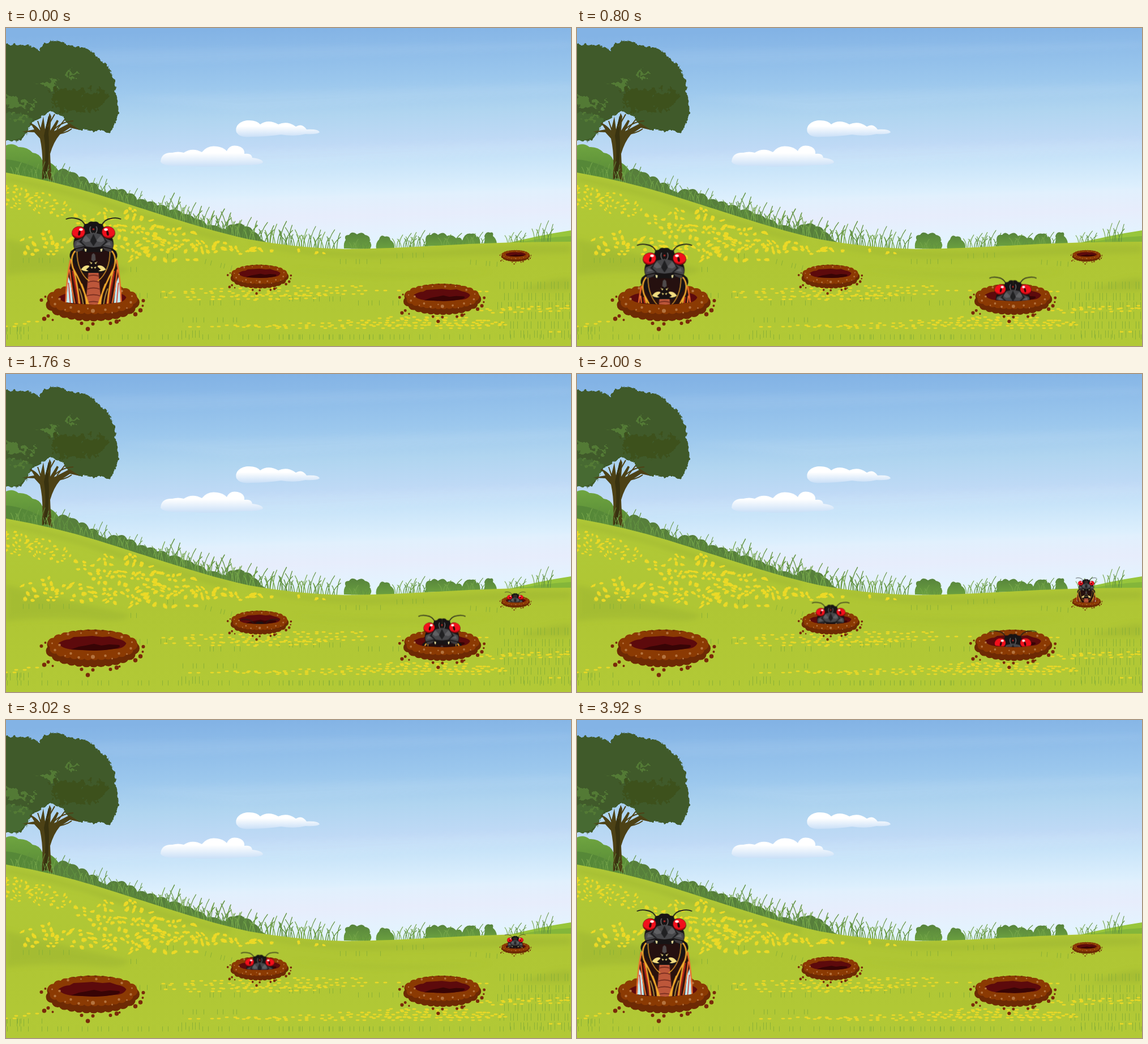
An HTML page without scripts that plays this animation: 998 px wide and 561 px high, repeating every 4450 ms.

```html
<!DOCTYPE html>
<html lang="en">
<head>
<meta charset="utf-8">
<title>Meadow cicadas</title>
<style>
html, body { margin: 0; width: 100%; height: 100%; overflow: hidden; background: #b0c834; }
svg { position: absolute; inset: 0; width: 100%; height: 100%; }
.dots { fill: none; stroke-linecap: round; }
.flowers path { stroke-dasharray: 0 15 0 24 0 12 0 33 0 18; }
.flowers .alt { stroke-dasharray: 0 27 0 14 0 22 0 11 0 37; }
.blades { fill: none; stroke: #8bb136; stroke-width: 9; stroke-dasharray: 1 9 1 17 1 5 1 12 1 23; }
.bug { animation: 4450ms linear infinite; }
.near { animation-name: near; }
.mid { animation-name: mid; }
.right { animation-name: right; }
.far { animation-name: far; }
@keyframes near {
  0%, 11.24% { transform: translateY(0); }
  17.98% { transform: translateY(46px); }
  25.39% { transform: translateY(160px); }
  74.6% { transform: translateY(201px); }
  88.09%, 100% { transform: translateY(0); }
}
@keyframes right {
  0%, 11.23% { transform: translateY(150px); }
  11.24% { transform: translateY(99px); }
  26.07%, 33.48% { transform: translateY(0); }
  49.66%, 53.47% { transform: translateY(99px); }
  53.48%, 100% { transform: translateY(150px); }
}
@keyframes mid {
  0%, 33.48% { transform: translateY(145px); }
  49.66%, 61.8% { transform: translateY(0); }
  74.6% { transform: translateY(113px); }
  75%, 100% { transform: translateY(145px); }
}
@keyframes far {
  0%, 33.48% { transform: translateY(184px); }
  45.62%, 61.8% { transform: translateY(0); }
  77.3%, 100% { transform: translateY(184px); }
}
</style>
</head>
<body>
<svg viewBox="0 0 998 561" preserveAspectRatio="none">
  <defs>
    <linearGradient id="sky" gradientUnits="userSpaceOnUse" x1="490" y1="0" x2="502" y2="390">
      <stop offset="0" stop-color="#83b3e5"/>
      <stop offset=".25" stop-color="#9bc7ed"/>
      <stop offset=".4" stop-color="#b0d5f0"/>
      <stop offset=".54" stop-color="#c0daf6"/>
      <stop offset=".62" stop-color="#c8e4f9"/>
      <stop offset=".75" stop-color="#dceffd"/>
      <stop offset=".77" stop-color="#e1f0fd"/>
      <stop offset=".86" stop-color="#e7edfc"/>
      <stop offset="1" stop-color="#e2f5ff"/>
    </linearGradient>
    <linearGradient id="cloud" x2="0" y2="1">
      <stop offset=".35" stop-color="#fff"/>
      <stop offset="1" stop-color="#c9dff7"/>
    </linearGradient>
    <linearGradient id="verge" x2="0" y2="1">
      <stop offset="0" stop-color="#6fa540"/>
      <stop offset="1" stop-color="#4f8033"/>
    </linearGradient>
    <linearGradient id="bush" x2="0" y2="1">
      <stop offset="0" stop-color="#56833b"/>
      <stop offset="1" stop-color="#6ba040"/>
    </linearGradient>
    <linearGradient id="field" x2="0" y2="1">
      <stop offset="0" stop-color="#b1c937"/>
      <stop offset=".5" stop-color="#afc634"/>
      <stop offset="1" stop-color="#b2c936"/>
    </linearGradient>
    <filter id="leafy" x="-10%" y="-10%" width="120%" height="120%">
      <feTurbulence type="fractalNoise" baseFrequency=".13" numOctaves="2" seed="4"/>
      <feDisplacementMap in="SourceGraphic" scale="9" xChannelSelector="R" yChannelSelector="G"/>
    </filter>
    <filter id="ragged" x="-20%" y="-20%" width="140%" height="140%">
      <feTurbulence type="fractalNoise" baseFrequency=".09" numOctaves="3" seed="9"/>
      <feDisplacementMap in="SourceGraphic" scale="34" xChannelSelector="R" yChannelSelector="G"/>
    </filter>
    <filter id="scatter">
      <feTurbulence type="fractalNoise" baseFrequency=".035" seed="3"/>
      <feDisplacementMap in="SourceGraphic" scale="24" xChannelSelector="R" yChannelSelector="G"/>
    </filter>
    <filter id="soft"><feGaussianBlur stdDeviation="5"/></filter>
    <g id="tuft" fill="none" stroke="#74a449" stroke-width="1.5" stroke-linecap="round">
      <path d="M-20 2Q-21-14-27-24M-17 2Q-17-12-12-22M-12 2Q-12-20-4-35M-7 2Q-9-15-16-23"/>
      <path d="M-3 3Q-2-14 4-22M1 3Q3-22 15-40M6 3Q5-14 0-25M10 4Q14-14 27-24M15 4Q14-12 10-18M19 5Q20-20 26-33" stroke="#629240"/>
    </g>
    <g id="hole">
      <g fill="none" stroke="#7a2a0a" stroke-linecap="round">
        <path stroke-width="7.5" d="M-85 29h0M-8 47h0M43 34h0M76 21h0M85 14h0"/>
        <path stroke-width="6" d="M-90-4h0M-78 24h0M-19 37h0M1 38h0M32 37h0M90-3h0"/>
        <path stroke-width="4" d="M-70 31h0M48 32h0M89 6h0M-83-10h0"/>
      </g>
      <ellipse rx="73" ry="23" fill="#6d2a04" stroke="#6d2a04" stroke-width="21" stroke-linecap="round" stroke-dasharray="0 13"/>
      <ellipse cy="-6" rx="71" ry="18" fill="#8b3a03" stroke="#8b3a03" stroke-width="18" stroke-linecap="round" stroke-dasharray="0 12"/>
      <path d="M-60-9Q-50-16-40-16L-33-20L-14-21L0-22L18-20L31-21L43-17Q56-15 60-9Q56 1 38 1L22 3L4 4L-18 3L-36 2Q-55 0-60-9z" fill="#5d0a0c"/>
      <path d="M-38 2L-24-3L-12-5L3-8L16-5L30-7L47-6Q53-2 38 1L22 3L4 4L-18 3z" fill="#380405"/>
      <g class="dots" stroke="#b4733f">
        <path stroke-width="7" d="M1 15h0"/>
        <path stroke-width="4.5" d="M-38 9h0M-24 16h0M23 13h0M47 9h0M68 0h0M-58-6h0M-66 3h0M7-27h0M-43-25h0M52-20h0"/>
        <path stroke-width="3" d="M-48 13h0M-8 11h0M35 18h0M61 10h0M-20-27h0M29-27h0M-71-9h0M70-11h0"/>
      </g>
    </g>
  </defs>

  <rect width="998" height="561" fill="url(#sky)"/>
  <g fill="#fff" opacity=".05" filter="url(#soft)">
    <path d="M0 42L998 25V34L330 61L0 66zM200 122L998 98V112L410 145zM0 230L998 195V212L520 242L0 250z"/>
  </g>
  <g fill="url(#cloud)">
    <path d="M407 184C403 171 417 162 430 163Q443 163 449 170Q463 160 481 170Q497 163 512 174Q523 167 531 179Q552 178 554 184Q549 188 529 187Q508 192 486 188Q458 192 431 192Q413 194 407 184z"/>
    <path d="M273 236Q274 219 294 220Q304 217 314 220Q329 210 346 219Q356 206 373 209Q383 210 390 217Q395 205 409 208Q422 211 421 222Q434 220 435 229Q453 231 454 237Q450 242 421 242Q366 247 316 243Q278 245 273 236z"/>
  </g>

  <path d="M0 207Q12 202 22 210Q37 209 47 220Q59 221 64 233Q84 236 94 254Q112 260 130 285L0 270z" fill="url(#verge)"/>
  <path d="M0 232Q45 235 100 274L0 262z" fill="#568838"/>
  <path d="M72 274L92 252Q101 243 112 254Q125 253 129 263Q141 258 147 274Q160 269 164 284L178 291Q187 280 197 286Q209 280 214 292Q228 289 231 303Q244 299 249 307Q262 303 267 313Q283 309 287 322Q302 316 313 328Q328 328 334 337Q350 337 355 349Q372 345 381 355Q388 353 390 356Q391 344 403 347Q415 341 421 350Q434 349 436 359Q446 361 450 372L470 385H300z" fill="#577f3b"/>

  <g filter="url(#leafy)" transform="translate(-2 0)">
    <path d="M-9 27Q14 29 25 31Q48 26 61 43Q59 26 90 22Q106 26 122 34Q153 32 163 54Q184 61 187 81Q199 90 196 119Q204 146 198 157Q195 174 184 187Q172 178 157 182Q143 175 133 181Q118 179 108 165Q98 149 78 148L56 163Q41 172 39 187Q25 204 15 198L-9 194z" fill="#3f5a29"/>
    <path d="M-9 151Q20 145 50 160L38 184Q22 204-9 196z" fill="#466b30"/>
  </g>
  <g filter="url(#ragged)" transform="translate(-4 -2)">
    <path d="M82 113Q115 101 142 117Q170 103 184 119Q179 151 146 145Q117 158 90 140z" fill="#3d511f"/>
    <path d="M-8 121L24 125L43 137L61 131L51 142L27 139L2 143zM57 101L80 92L99 104L76 108zM110 85L125 80L132 87L113 92zM11 160L33 157L42 165L18 168z" fill="#537a36"/>
  </g>
  <path d="M63 267Q67 226 60 195L50 184L28 183L50 179L42 166L60 181L66 156L69 179L77 150L80 156L78 181L90 162L93 164L85 182L112 168L131 180L113 176L95 188Q84 201 78 222Q79 251 82 270L73 265z" fill="#4d4216"/>
  <path d="M65 265Q73 226 67 190L75 155L77 159L75 187Q78 212 72 265z" fill="#383210"/>
  <path d="M80 184Q96 165 119 164M64 188Q52 170 42 169M82 188Q104 187 116 178M73 175L86 152M62 182L56 164M90 179L104 161" fill="none" stroke="#4d4216" stroke-width="2"/>

  <g fill="url(#bush)">
    <path d="M597 389Q596 378 600 374Q596 365 606 365Q611 357 620 364Q629 358 634 365Q645 367 642 376Q648 382 643 390zM654 390Q652 379 659 373Q662 363 669 368Q678 366 679 374Q687 378 686 389z"/>
    <path d="M739 385Q743 379 741 374Q741 363 751 365Q756 358 763 365Q773 357 779 367Q788 363 795 371Q803 367 806 375Q811 360 822 363Q830 361 831 369Q837 365 838 382zM844 380Q847 374 845 367Q848 358 855 361Q862 359 860 367Q866 371 867 380z"/>
  </g>
  <path d="M880 381Q944 365 998 357V385z" fill="#98c63c"/>
  <path d="M905 378Q955 369 998 367V380z" fill="#84b63a"/>

  <g>
    <use href="#tuft" transform="translate(60 268) scale(.6 .8)"/>
    <use href="#tuft" transform="translate(30 262) scale(.8 .7)"/>
    <use href="#tuft" transform="translate(92 275) scale(.8 .9)"/>
    <use href="#tuft" transform="translate(124 284) scale(-.7 .6)"/>
    <use href="#tuft" transform="translate(160 293) scale(.7 .8)"/>
    <use href="#tuft" transform="translate(192 302) scale(-.7 .6)"/>
    <use href="#tuft" transform="translate(222 311) scale(.7 .7)"/>
    <use href="#tuft" transform="translate(255 321) scale(-.7 .5)"/>
    <use href="#tuft" transform="translate(284 331) scale(.9 1)"/>
    <use href="#tuft" transform="translate(302 337) scale(-.8 .9)"/>
    <use href="#tuft" transform="translate(322 344) scale(.9 .9)"/>
    <use href="#tuft" transform="translate(347 352) scale(.8 .9)"/>
    <use href="#tuft" transform="translate(371 359) scale(1 1)"/>
    <use href="#tuft" transform="translate(392 364) scale(-.8 1)"/>
    <use href="#tuft" transform="translate(420 370) scale(.9 .9)"/>
    <use href="#tuft" transform="translate(447 375) scale(1 .8)"/>
    <use href="#tuft" transform="translate(482 381) scale(.9 1)"/>
    <use href="#tuft" transform="translate(507 384) scale(-.9 .8)"/>
    <use href="#tuft" transform="translate(535 386) scale(.8 .9)"/>
    <use href="#tuft" transform="translate(567 388) scale(.9 .8)"/>
    <use href="#tuft" transform="translate(625 390) scale(.7 .5)"/>
    <use href="#tuft" transform="translate(704 386) scale(.8 .6)"/>
    <use href="#tuft" transform="translate(728 385) scale(.8 .7)"/>
    <use href="#tuft" transform="translate(790 382) scale(1 .5)"/>
    <use href="#tuft" transform="translate(832 380) scale(.7 .5)"/>
    <use href="#tuft" transform="translate(900 378) scale(.7 .5)"/>
    <use href="#tuft" transform="translate(948 376) scale(.7 .9)"/>
  </g>

  <path d="M0 255Q85 270 160 293C270 327 350 356 430 373Q512 388 600 390Q680 389 760 384Q880 377 998 377V561H0z" fill="url(#field)"/>
  <g fill="#9bb431" filter="url(#soft)" opacity=".5">
    <path d="M0 261Q100 279 205 315Q300 346 400 370L390 378Q240 341 140 303Q60 282 0 270z"/>
    <path d="M0 372Q120 403 218 424Q214 440 150 433Q60 428 0 436zM430 378Q600 403 770 392Q880 380 998 383V397Q800 402 640 406Q500 402 430 378zM905 464Q956 442 998 441V463z"/>
    <path d="M500 425Q690 449 860 429Q690 441 500 425z"/>
  </g>

  <g class="blades">
    <path d="M30 410H125M220 426H245M352 412l75 18M590 412H665M690 402l60-2M820 413L872 417M285 402h22"/>
    <path stroke-dashoffset="8" d="M0 545H998M0 531H70M310 515H420M480 545H700M620 485H700M210 472H300M480 478H610M340 485H420"/>
    <path stroke-width="13" stroke-dasharray="1 6 1 11 1 4" d="M872 454H998M880 474H998M868 490H998M880 507H998M872 524H998M890 540H998M310 540H345M0 534H35"/>
  </g>
  <g filter="url(#scatter)">
    <g class="dots flowers" stroke="#ecd925" transform="scale(1 .72)">
      <path stroke-width="5.5" d="M0 386l42 10M3 393l70 18M0 400l100 25M5 407l103 25M0 416l116 28M4 425l110 27M0 433l112 26M8 442l96 20"/>
      <path class="alt" stroke-width="5" d="M0 391l40 5M0 397l82 18M0 411l108 24M0 421l90 21"/>
      <path stroke-width="7.5" d="M176 445l68 6M124 457l130 8M139 467l130 3M123 478l200 13M145 489l185 5M65 501l30 2M150 500l190 6M65 512l60 4M161 511l202 14M30 520l380 8M52 532l360 2M40 543l420 0M33 553l220 3M232 550l250-4M180 563l185 4"/>
      <path class="alt" stroke-width="6.5" d="M180 450l58 6M160 484l155 6M180 496l160 11M150 537l330 4M520 550l54 5"/>
      <path stroke-width="10" stroke-dasharray="none" d="M90 525h2M437 537h4M270 516h1M264 509h1"/>
    </g>
  </g>
  <g class="dots flowers" stroke="#e9d827" transform="scale(1 .4)">
    <path stroke-width="7" d="M278 1163l362-5M330 1151l302-8M410 1177l228-4M282 1188l268-8M326 1198l220-6M510 1138l130 0M655 1158h46M798 1162h66"/>
    <path class="alt" stroke-width="7" d="M290 1169l330 0M380 1183l220-4M440 1200l95-8"/>
    <path stroke-width="7" d="M325 1318l170-4M390 1311l500-2M480 1324l390 0M520 1302l360-4M590 1290l270 0M660 1280l180-3M840 1246l158-10M890 1232l108-8M860 1256l120-8M962 1340h36M0 1316h36M18 1305h28M40 1295h26"/>
    <path class="alt" stroke-width="7" d="M420 1319l180-3M610 1297l270 8M650 1315l240-4M700 1285l170 6M630 1308l240 6M850 1239l148-4M680 1274l110 2"/>
  </g>

  <use href="#hole" transform="translate(900 402) scale(.305)"/>
  <use href="#hole" transform="translate(447.500 438.500) scale(.62 .635)"/>
  <use href="#hole" transform="translate(770 478.500) scale(.83)"/>
  <use href="#hole" transform="translate(152.500 484)"/>
</svg>

<svg viewBox="0 0 998 561" preserveAspectRatio="none">
  <defs>
    <clipPath id="mouth">
      <path d="M-95-220V-9H-60Q-56 1-38 1L-18 3L4 4L22 3L38 1Q56 1 60-9H95V-220z"/>
    </clipPath>
    <g id="wing">
      <path d="M-34 62Q-46 88-49 151L-8 157L-4 92z" fill="#2a120d"/>
      <path d="M-45 103L-48 150L-36 152L-40 116z" fill="#c4eff5"/>
      <path d="M-38 98L-29 153L-21 154L-29 118z" fill="#7d1d13"/>
      <g fill="none" stroke-linecap="round">
        <path d="M-41 76Q-48 112-49 151M-42 93Q-39 124-33 152" stroke="#ee6c2e" stroke-width="2.4"/>
        <path d="M-44 116L-41 151M-37 95L-24 152" stroke="#d22d21" stroke-width="1.6"/>
      </g>
    </g>
    <g id="veins" fill="none" stroke="#f3a92c" stroke-linecap="round" stroke-width="2.6">
      <path d="M-33 60Q-42 72-36 90Q-20 118-9 153M-35 92Q-27 124-25 153M-21 118Q-14 134-12 154"/>
      <path d="M-29 61Q-29 78-24 90Q-18 105-8 112" stroke="#d9952a" stroke-width="1.6"/>
      <path d="M-25 126Q-20 138-18 154" stroke="#e9c150" stroke-width="1.3"/>
    </g>
    <g id="side">
      <path d="M-14 15Q-20 3-31 2Q-41 0-48 3" fill="none" stroke="#20201d" stroke-width="1.8" stroke-linecap="round"/>
      <path d="M0 8Q-7 6-10 11L-16 12L-20 24L-34 38Q-37 48-34 55L-40 60Q-45 70-38 76L-30 86L-20 98H0z" fill="#171415"/>
      <path d="M0 27L-13 30L-23 38L-33 42Q-36 49-33 55L-17 51L0 53z" fill="#47474a"/>
      <path d="M-13 32L-21 39L-14 44L-4 42zM-29 43L-31 50L-19 48z" fill="#606063"/>
      <path d="M0 29L-6 42L0 51zM-15 31L-25 43L-16 51L-12 52L-21 43z" fill="#202022"/>
      <ellipse cx="-26" cy="27" rx="12.500" ry="11" transform="rotate(-18 -26 27)" fill="#241011"/>
      <ellipse cx="-26.500" cy="26.500" rx="11.500" ry="10" transform="rotate(-18 -26.500 26.500)" fill="#f2101c"/>
      <path d="M-37 30Q-28 39-16 31Q-20 37-27 37Q-35 37-37 30z" fill="#a5080e"/>
      <ellipse cx="-25" cy="28" rx="2" ry="4.500" transform="rotate(12 -25 28)" fill="#2a0708"/>
      <ellipse cx="-22" cy="21.500" rx="3.200" ry="2.200" fill="#fff"/>
      <path d="M-5 16Q-8 22-4 28" fill="none" stroke="#8b8b8c" stroke-width="1.2"/>
      <path d="M0 61L-13 62L-24 58Q-30 70-26 84L-14 95H0z" fill="#25100f"/>
      <path d="M-31 56L-16 53L-20 58L-33 63z" fill="#3e3a3c"/>
      <path d="M-16 55L-12 56L-13 61L-15 60z" fill="#f4e8a4"/>
      <path d="M-22 92Q-16 83-8 85L-5 93Q-14 98-22 92zM-7 78L-2 80L-4 83z" fill="#f2dd81"/>
      <path d="M0 76L-6 79L-7 87L-13 92L-7 96H0z" fill="#171010"/>
      <path d="M-6 79L-2 80L-4 83zM-5 87L-1 88L-3 91z" fill="#f2dd81"/>
    </g>
    <g id="cicada">
      <use href="#wing"/><use href="#wing" transform="scale(-1 1)"/>
      <path d="M-9 98H9L14 158H-14z" fill="#bd573a"/>
      <path d="M-10 104Q0 100 10 104M-11 115Q0 110 11 115M-12 127Q0 122 12 127M-13 139Q0 134 13 139M-13 151Q0 146 13 151" fill="none" stroke="#7d3021" stroke-width="1.8"/>
      <use href="#side"/><use href="#side" transform="scale(-1 1)"/>
      <use href="#veins"/><use href="#veins" transform="scale(-1 1)"/>
      <path d="M-3 66L0 63L3 66L4 75L0 78L-4 75z" fill="#4f4a4b"/>
      <circle cy="21" r="1.800" fill="#b62420"/>
    </g>
  </defs>
  <g transform="translate(900 402) scale(.305)" clip-path="url(#mouth)">
    <g class="bug far"><use href="#cicada" transform="translate(-2 -151) scale(1.23)"/></g>
  </g>
  <g transform="translate(447.500 438.500) scale(.62)" clip-path="url(#mouth)">
    <g class="bug mid"><use href="#cicada" transform="translate(1 -101) scale(1.1)"/></g>
  </g>
  <g transform="translate(770 478.500) scale(.83)" clip-path="url(#mouth)">
    <g class="bug right"><use href="#cicada" transform="translate(0 -102) scale(1.03)"/></g>
  </g>
  <g transform="translate(152.500 484)" clip-path="url(#mouth)">
    <g class="bug near"><use href="#cicada" transform="translate(2 -150)"/></g>
  </g>
</svg>
</body>
</html>
```
